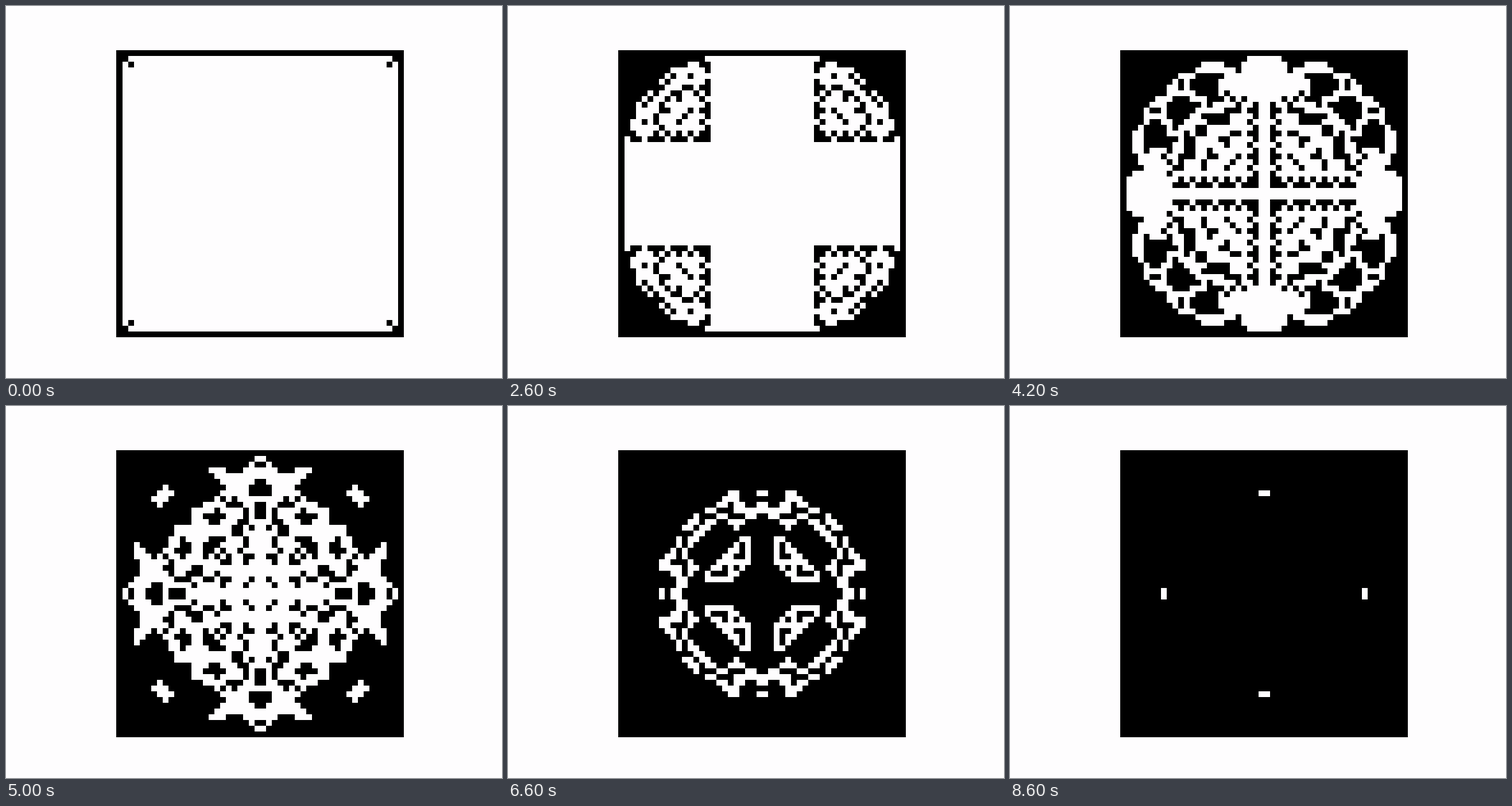
Write an HTML page with a canvas that moves like this. It is 864 px wide and 648 px high and loops after 10 s.

```html
<!DOCTYPE html>
<html lang="en">
<head>
<meta charset="utf-8">
<title>Cellular automaton</title>
<style>
html, body { margin: 0; width: 100%; height: 100%; overflow: hidden; background: #fefdfe; }
canvas { display: block; }
</style>
</head>
<body>
<canvas id="stage" width="864" height="648"></canvas>
<script>
const ctx = document.getElementById('stage').getContext('2d');
const SIZE = 50, CELL = 10, LEFT = 193, TOP = 77;
const STEP = 200, LOOP = 10000, LAST = 43;
const BORN = [1, 5, 6, 8], STAY = [0, 1, 4, 5, 6, 7, 8];

const isEdge = (x, y) => x % (SIZE - 1) === 0 || y % (SIZE - 1) === 0;

const makeGrid = rule => Array.from({ length: SIZE }, (_, y) =>
  Array.from({ length: SIZE }, (_, x) => isEdge(x, y) || rule(x, y)));

function countAround(grid, x, y) {
  let n = 0;
  for (let dy = -1; dy <= 1; dy++)
    for (let dx = -1; dx <= 1; dx++)
      if ((dx || dy) && grid[y + dy][x + dx]) n++;
  return n;
}

const evolve = grid => makeGrid((x, y) =>
  (grid[y][x] ? STAY : BORN).includes(countAround(grid, x, y)));

// The loop opens two generations after an empty walled square.
const history = [evolve(evolve(makeGrid(() => false)))];
while (history.length <= LAST) history.push(evolve(history[history.length - 1]));

function draw(grid) {
  ctx.fillStyle = '#fefdfe';
  ctx.fillRect(0, 0, 864, 648);
  ctx.fillStyle = '#000';
  ctx.fillRect(LEFT - 1, TOP, SIZE * CELL + 1, SIZE * CELL);
  ctx.fillStyle = '#fefdfe';
  grid.forEach((row, y) => row.forEach((black, x) => {
    if (!black) ctx.fillRect(LEFT + x * CELL, TOP + y * CELL, CELL, CELL);
  }));
}

const start = performance.now();
function tick() {
  const time = (performance.now() - start) % LOOP;
  draw(history[Math.min(LAST, Math.floor(time / STEP))]);
  requestAnimationFrame(tick);
}
tick();
</script>
</body>
</html>
```
